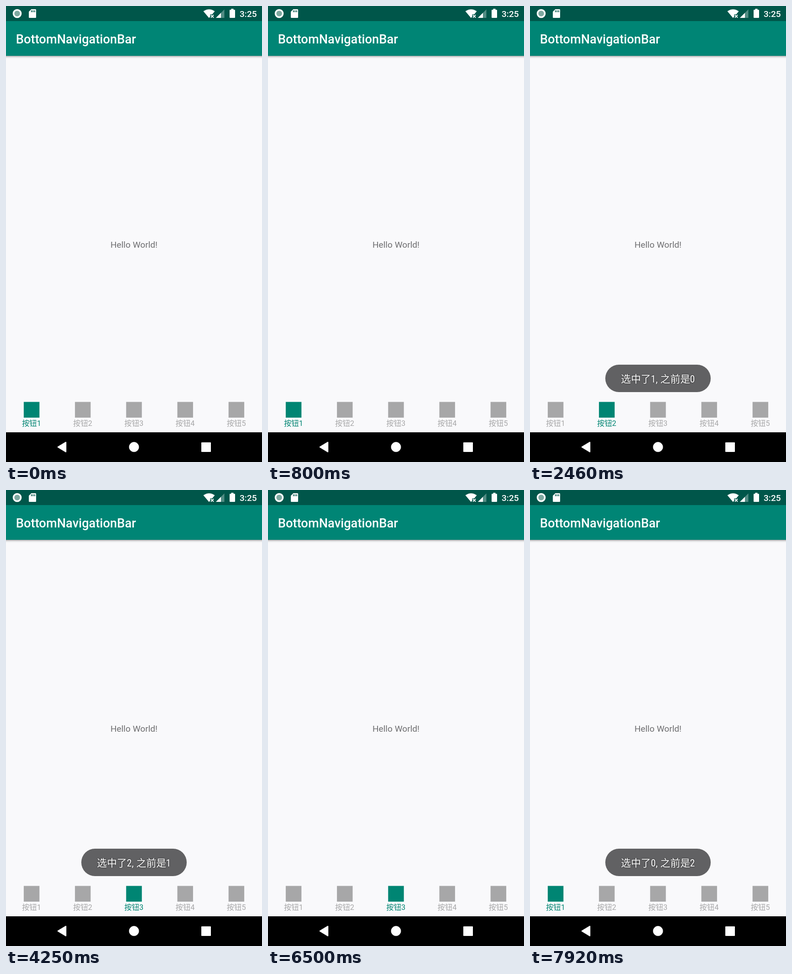
Animation, 561 px wide and 998 px high, one loop 7960 ms. Source, as an HTML page:

```html
<!DOCTYPE html>
<html lang="zh-CN">
<head>
<meta charset="utf-8">
<title>BottomNavigationBar</title>
<style>
  html, body { margin: 0; width: 100%; height: 100%; overflow: hidden; background: #f9f9fb; }
  svg { display: block; width: 100%; height: 100%; }
  text { font-family: Roboto, "Noto Sans CJK SC", "Noto Sans CJK", sans-serif; }
  .title { font-size: 27.3px; font-weight: 500; fill: #fff; }
  .clock { font-size: 19.1px; font-weight: 500; fill: #fff; }
  .hello { font-size: 19.1px; fill: #6f6f71; text-anchor: middle; }
  .tab { fill: #a7a7a8; }
  .tab text { font-size: 16.4px; text-anchor: middle; }
  .tab.on { fill: #008573; }
  .toast text {
    font-family: "Roboto Condensed", Roboto, "Noto Sans CJK SC", "Noto Sans CJK", sans-serif;
    font-size: 21.84px; font-stretch: 75%; fill: #fff;
    text-shadow: 0 0 2.5px rgba(0, 0, 0, .7);
  }
</style>
</head>
<body>
<svg id="stage" viewBox="0 0 561 998" preserveAspectRatio="none">
  <defs>
    <linearGradient id="shade" x2="0" y2="1">
      <stop offset="0" stop-color="#000" stop-opacity=".36"/>
      <stop offset=".4" stop-color="#000" stop-opacity=".12"/>
      <stop offset="1" stop-color="#000" stop-opacity="0"/>
    </linearGradient>
  </defs>
  <rect width="561" height="998" fill="#f9f9fb"/>
  <rect y="109" width="561" height="6" fill="url(#shade)"/>
  <rect y="33" width="561" height="76" fill="#008575"/>
  <rect width="561" height="33" fill="#00564a"/>

  <!-- status icons -->
  <circle cx="24.5" cy="16.5" r="8" fill="#7fa9a1" stroke="#fff" stroke-width="3.6"/>
  <path d="M55.5 7H64.5Q66 7 66 8.5V24.5Q66 26 64.5 26H51.5Q50 26 50 24.5V12.5Z" fill="#fff"/>
  <path d="M55.8 9.5v4M59.3 9.5v4M62.8 9.5v4" stroke="#00564a" stroke-width="1.8"/>
  <path d="M432.5 11.5Q445 3 457.5 11.5L452 18.3H447.5V23.3L445 26.2Z" fill="#fff"/>
  <path d="M449 19.5l6 6m0-6l-6 6" stroke="#fff" stroke-width="1.8"/>
  <path d="M460 26L478.5 7.5V26Z" fill="#fff" fill-opacity=".32"/>
  <path d="M460 26L471 15V26Z" fill="#fff"/>
  <path d="M493.5 6h5v2.3h2.2q1.3 0 1.3 1.3v15.1q0 1.3-1.3 1.3h-9.4q-1.3 0-1.3-1.3v-15.1q0-1.3 1.3-1.3h2.2Z" fill="#fff"/>
  <text class="clock" x="512" y="24.2">3:25</text>

  <text class="title" x="21.8" y="81.5">BottomNavigationBar</text>
  <text class="hello" x="280.5" y="528.7">Hello World!</text>
  <g id="tabs"></g>

  <!-- system navigation -->
  <rect y="933" width="561" height="65" fill="#000"/>
  <g fill="#fff" stroke="#fff" stroke-linejoin="round">
    <path d="M114 965.2L131 955V975.4Z" stroke-width="2.5"/>
    <circle cx="280.5" cy="965.2" r="10.6" stroke-width="0.8"/>
    <rect x="429" y="956" width="19" height="19" stroke-width="2"/>
  </g>
  <g id="toasts"></g>
</svg>
<script>
const LOOP = 7960, FADE = 500, SHOWN = 2000, LEAD = 30;
const events = [
  { at: 1400, now: 1, before: 0 },
  { at: 3766, now: 2, before: 1 },
  { at: 6740, now: 0, before: 2 }
];

function add(parent, tag, attrs, text) {
  const el = document.createElementNS("http://www.w3.org/2000/svg", tag);
  for (const key in attrs) el.setAttribute(key, attrs[key]);
  if (text) el.textContent = text;
  return parent.appendChild(el);
}

const tabs = [1, 2, 3, 4, 5].map(n => {
  const x = 112.2 * (n - 0.5);
  const tab = add(document.getElementById("tabs"), "g", { class: "tab" });
  add(tab, "rect", { x: x - 17.2, y: 866.5, width: 34.4, height: 34.4 });
  add(tab, "text", { x: x - 0.2, y: 918.6 }, "按钮" + n);
  return tab;
});

const toasts = events.map(e => {
  const toast = add(document.getElementById("toasts"), "g", { class: "toast" });
  add(toast, "rect", { x: 165, y: 785, width: 231, height: 60, rx: 30, fill: "#616163" });
  const parts = [[199.3, "选中了"], [264.8, e.now + ","], [285.6, "之前是"], [350.4, e.before]];
  for (const [x, part] of parts) add(toast, "text", { x, y: 823.6 }, String(part));
  return toast;
});

const clamp = v => Math.min(1, Math.max(0, v));

// Decelerating fade in, accelerating fade out
function alpha(age) {
  const rise = clamp(age / FADE), fall = clamp((age - SHOWN) / FADE);
  return (1 - (1 - rise) ** 2) * (1 - fall ** 2);
}

const start = performance.now();
function draw() {
  const t = (performance.now() - start) % LOOP;
  let active = 0;
  events.forEach((e, i) => {
    if (t >= e.at - LEAD) active = e.now;
    toasts[i].setAttribute("opacity", alpha(t - e.at));
  });
  tabs.forEach((tab, i) => tab.classList.toggle("on", i === active));
  requestAnimationFrame(draw);
}
draw();
</script>
</body>
</html>
```
